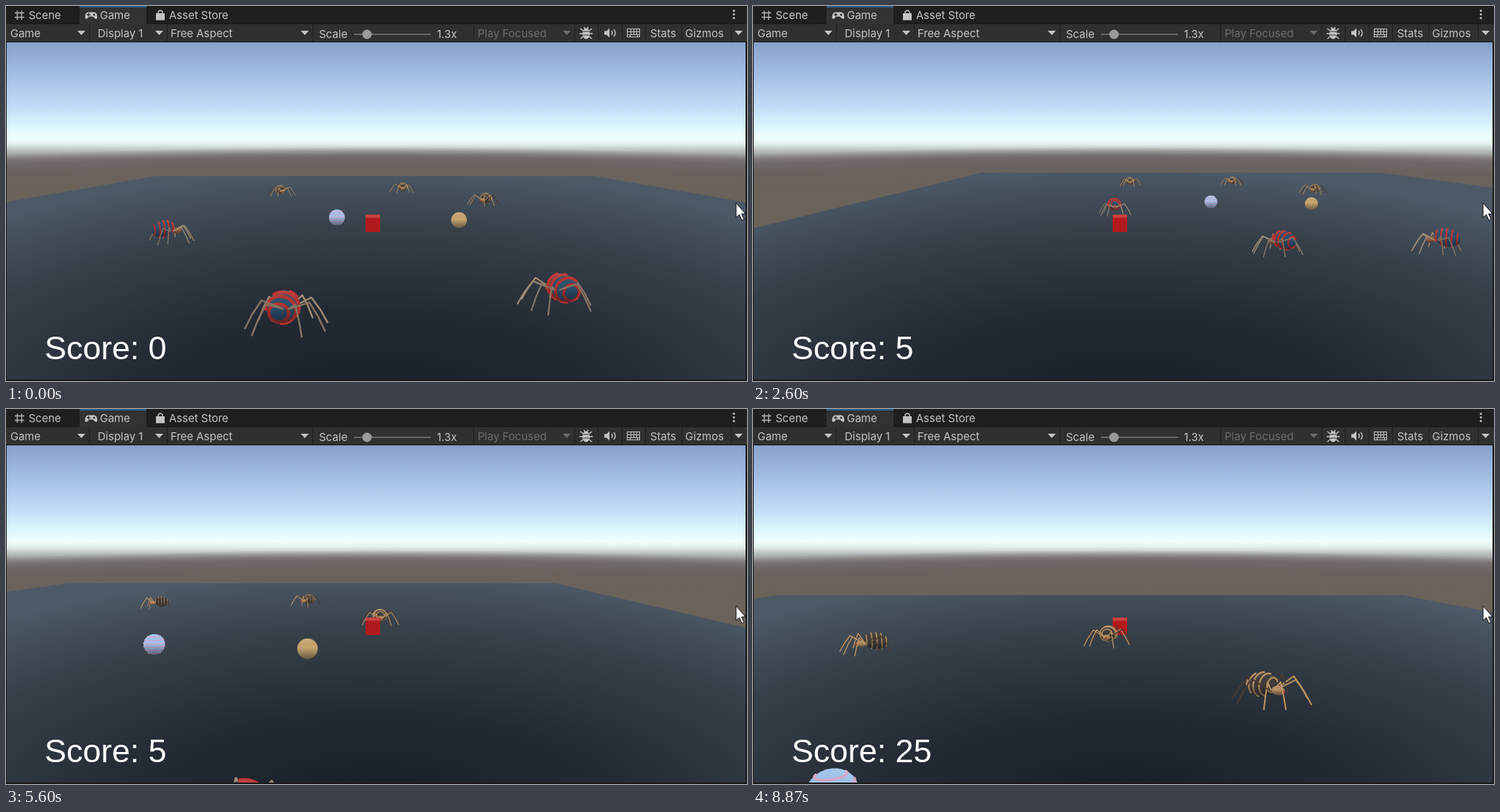
These frames come from a looping animation (1018 by 516 pixels, 8940 ms). An HTML page:

```html
<!DOCTYPE html>
<html lang="en">
<head>
<meta charset="utf-8">
<title>Game view</title>
<style>
  html, body { margin: 0; width: 100%; height: 100%; overflow: hidden; background: #191919; }
  svg { display: block; width: 1018px; height: 516px; }
  .ui { font: 15px Inter, Roboto, sans-serif; fill: #c4c4c4; }
  .score { font: 45px "Liberation Sans", Arial, sans-serif; fill: #fff; }
</style>
</head>
<body>
<svg viewBox="0 0 1018 516">
  <defs>
    <linearGradient id="sky" gradientUnits="userSpaceOnUse" x1="0" y1="50" x2="0" y2="250">
      <stop offset="0" stop-color="#86a1cb"/>
      <stop offset=".25" stop-color="#a5c2e8"/>
      <stop offset=".45" stop-color="#c2def6"/>
      <stop offset=".58" stop-color="#dcf6fd"/>
      <stop offset=".66" stop-color="#effffe"/>
      <stop offset=".7" stop-color="#e3efee"/>
      <stop offset=".75" stop-color="#b4b9b8"/>
      <stop offset=".81" stop-color="#8a8786"/>
      <stop offset="1" stop-color="#6c6663"/>
    </linearGradient>
    <radialGradient id="earth" gradientUnits="userSpaceOnUse" cx="508" cy="13100" fr="12850" r="13050">
      <stop offset="0" stop-color="#6a6359"/>
      <stop offset=".15" stop-color="#6a625e"/>
      <stop offset=".21" stop-color="#706969"/>
      <stop offset=".28" stop-color="#706969" stop-opacity="0"/>
    </radialGradient>
    <radialGradient id="floor" gradientUnits="userSpaceOnUse" cx="0" cy="0" r="1"
      gradientTransform="translate(508 545) scale(850 320)">
      <stop offset="0" stop-color="#191f27"/>
      <stop offset=".4" stop-color="#242a34"/>
      <stop offset=".75" stop-color="#374049"/>
      <stop offset="1" stop-color="#4d5967"/>
    </radialGradient>
    <linearGradient id="shade" x2="0" y2="1">
      <stop offset="0" stop-color="#fff" stop-opacity=".1"/>
      <stop offset=".45" stop-color="#000" stop-opacity="0"/>
      <stop offset="1" stop-color="#0a1020" stop-opacity=".5"/>
    </linearGradient>
    <clipPath id="view"><rect x="1" y="50" width="1015" height="464"/></clipPath>
  </defs>

  <rect width="1018" height="516" fill="#191919"/>
  <g clip-path="url(#view)">
    <rect y="50" width="1018" height="466" fill="url(#sky)"/>
    <rect y="180" width="1018" height="336" fill="url(#earth)"/>
    <path id="plane" fill="url(#floor)"/>
    <g id="scene" fill="none" stroke-linejoin="round" stroke-linecap="round"></g>
    <text id="score" class="score" x="53" y="486">Score: 0</text>
  </g>

  <g class="ui">
    <rect width="1018" height="24" fill="#1f1f1f"/>
    <rect x="101" width="92" height="25" fill="#323232"/>
    <rect x="101" width="92" height="2" fill="#2c5d87"/>
    <rect y="25" width="1018" height="24" fill="#303030"/>
    <path id="seps" stroke="#1f1f1f"/>
    <text x="31" y="18">Scene</text>
    <text x="129" y="18">Game</text>
    <text x="224" y="18">Asset Store</text>
    <text x="6" y="43">Game</text>
    <text x="126" y="43">Display 1</text>
    <text x="226" y="43">Free Aspect</text>
    <text x="430" y="44">Scale</text>
    <text x="592" y="44">1.3x</text>
    <text x="648" y="43" fill="#6c6c6c">Play Focused</text>
    <text x="885" y="43">Stats</text>
    <text x="933" y="43">Gizmos</text>
    <path d="M98 34h11l-5.5 6zM205 34h11l-5.5 6zM405 34h11l-5.5 6zM1001 34h11l-5.5 6z"/>
    <path d="M765 34h11l-5.5 6z" fill="#6c6c6c"/>
    <path d="M478 39H584" stroke="#666" stroke-width="2"/>
    <circle cx="496" cy="39" r="6.5" fill="#9a9a9a"/>
    <path d="M15.5 6.5V19M21.5 6.5V19M12 9.5H25M12 15.5H25" stroke="#b4b4b4" stroke-width="1.4"/>
    <path d="M113 8.5h8q4 0 4.5 7q-.5 4 -4 1l-2-2h-5l-2 2q-3.5 3-4-1q.5-7 4.5-7z"/>
    <path d="M111 12h5M113.5 9.500v5" stroke="#323232" stroke-width="1.3"/>
    <circle cx="121" cy="12" r="1.5" fill="#323232"/>
    <path d="M206 10h12v9.500h-12z"/>
    <path d="M209 10V8q3-4 6 0v2" fill="none" stroke="#c4c4c4" stroke-width="1.4"/>
    <circle cx="1000" cy="6.5" r="1.5"/><circle cx="1000" cy="11.5" r="1.5"/><circle cx="1000" cy="16.5" r="1.5"/>
    <ellipse cx="797" cy="38" rx="5" ry="7.5"/>
    <path d="M789 31l4 3M805 31l-4 3M788 38h18M789 45l4-3M805 45l-4-3M794 29l2 3M800 29l-2 3" stroke="#c4c4c4" stroke-width="1.4"/>
    <path d="M793 35h8M793 40h8" stroke="#303030"/>
    <path d="M822 34.5h3l4-4v13l-4-4h-3z"/>
    <path d="M832 34q2 3 0 6M835 32q4 5 0 10" fill="none" stroke="#c4c4c4" stroke-width="1.4"/>
    <rect x="853.5" y="31.5" width="17" height="11" fill="none" stroke="#c4c4c4"/>
    <path d="M853 35.5h18M853 39.5h18M858.5 32v7M862.5 32v7M866.5 32v7M857.5 39v4M867.5 39v4" stroke="#c4c4c4"/>
  </g>
  <path d="M1003 271v20l4.500-4 3.500 8 3-1.500-3.500-7.500h5.500z" fill="#fff" stroke="#111" stroke-width="1"/>
</svg>

<script>
const LOOP = 8940, STEP = 200 / 3;
const CX = 508, CY = 282, HORIZON = 182, FOCAL = 900;
const pitch = Math.atan((CY - HORIZON) / FOCAL), S = Math.sin(pitch), C = Math.cos(pitch);
const CUBE_Z = 7.45, NEAR = 1;
const $ = id => document.getElementById(id);

$('seps').setAttribute('d', [114.5, 221.5, 421.5, 642.5, 781.5, 813.5, 846.5, 878.5, 928.5, 996.5]
  .map(x => `M${x} 25V49`).join(''));

// Lengths are in camera heights; camera keys are sideways offset and far edge below the horizon.
const camX = [[0, -.01], [1070, .85], [2600, 1.7], [4400, -1.025], [5600, -1.52], [7270, -.505], [8470, -.61]];
const camP = [[0, 52], [1070, 54.2], [1870, 51.3], [2600, 47], [2900, 45.2], [3400, 44.2], [3800, 44.6],
  [4400, 48], [5600, 57.8], [6600, 63.8], [7270, 68], [7530, 71], [8100, 74]];

// Hermite curve without overshoot
function curve(keys, t) {
  const n = keys.length - 1;
  if (t >= keys[n][0]) return keys[n][1];
  let i = 0;
  while (t >= keys[i + 1][0]) i++;
  const slope = k => (keys[k + 1][1] - keys[k][1]) / (keys[k + 1][0] - keys[k][0]);
  const tangent = k => {
    if (k === 0) return slope(0);
    if (k === n) return 0;
    const a = slope(k - 1), b = slope(k);
    return a * b <= 0 ? 0 : 2 * a * b / (a + b);
  };
  const [t0, v0] = keys[i], [t1, v1] = keys[i + 1], h = t1 - t0, u = (t - t0) / h, w = 1 - u;
  return v0 * (1 + 2 * u) * w * w + h * tangent(i) * u * w * w
    + v1 * u * u * (3 - 2 * u) - h * tangent(i + 1) * u * u * w;
}

const depthAt = p => FOCAL / (C * C * p) - S / C;
const camera = t => {
  const p = curve(camP, t);
  return { x: curve(camX, t), p, back: depthAt(p) };
};

const depth = ([, u, z]) => z * C + (1 - u) * S;
function project(v) {
  const d = depth(v);
  return [CX + FOCAL * v[0] / d, CY - FOCAL * ((v[1] - 1) * C + v[2] * S) / d];
}

// Ground positions as seen on screen, turned into places on the plane
const TIMES = [0, 1070, 2600, 4400, 5600, 7270, 8870];
function track(spots) {
  const keys = [];
  spots.forEach((s, i) => {
    if (!s) return;
    const cam = camera(TIMES[i]), p = s[1] - HORIZON;
    keys.push([TIMES[i], (s[0] - CX) / (C * p) - cam.x, cam.back - depthAt(p)]);
  });
  return t => [1, 2].map(k => {
    let i = 0;
    while (i < keys.length - 1 && t >= keys[i + 1][0]) i++;
    const a = keys[i], b = keys[i + 1];
    return b ? a[k] + (b[k] - a[k]) * (t - a[0]) / (b[0] - a[0]) : a[k];
  });
}

const RED = { base: '#2c526e', ring: '#b8322e', head: '#94604a', front: '#a08c74', rear: '#857463',
  up: .13, reach: .22, stripe: .8, flee: false };
const TAN = { base: '#423e3b', ring: '#b8925f', head: '#b08a5c', front: '#b89262', rear: '#493a34',
  up: .09, reach: .245, stripe: .5, flee: true };
const spiders = [
  [TAN, [[378, 260], [444, 266], [518, 247], [321, 248], [208, 273], [232, 308], [160, 333]]],
  [TAN, [[545, 256], [626, 262], [658, 246], [472, 247], [413, 270], [511, 303], [487, 323]]],
  [TAN, [[657, 273], [767, 283], [770, 258], [551, 260], [514, 295], [699, 354], [709, 400]]],
  [RED, [[225, 324], [344, 345], [497, 287], [172, 291]]],
  [RED, [[385, 443], [660, 522], [722, 341], [236, 352]]],
  [RED, [[757, 414], null, [942, 338], [518, 349]]]
].map(([look, spots], id) => ({ look, at: track(spots), id }));

const balls = [
  { x: -.437, back: 9.93, r: .09, base: '#a0c4ee', ring: '#dba6c6', stripe: .6, rings: 6 },
  { x: .94, back: 10.15, r: .087, base: '#c8a570', rings: 0 }
];

const fmt = pts => pts.map(p => p[0].toFixed(1) + ' ' + p[1].toFixed(1)).join('L');
const line = (pts, color, width) =>
  `<path d="M${fmt(pts)}" stroke="${color}" stroke-width="${Math.max(.8, width).toFixed(2)}"/>`;
const add = (a, b, k = 1) => a.map((v, i) => v + b[i] * k);
const dot = (a, b) => a.reduce((s, v, i) => s + v * b[i], 0);

// Ellipsoid with half-axes a, b, c and stripes around a
function ellipsoid(o, a, b, c, look, rings) {
  const mid = project(o), scale = FOCAL / depth(o);
  let xx = 0, xy = 0, yy = 0;
  for (const axis of [a, b, c]) {
    const q = project(add(o, axis, .01)), dx = (q[0] - mid[0]) * 100, dy = (q[1] - mid[1]) * 100;
    xx += dx * dx; xy += dx * dy; yy += dy * dy;
  }
  const l1 = Math.sqrt(xx), l2 = xy / l1, l3 = Math.sqrt(yy - l2 * l2);
  const rim = Array.from({ length: 28 }, (_, i) => {
    const g = i * Math.PI / 14, cs = Math.cos(g);
    return [mid[0] + l1 * cs, mid[1] + l2 * cs + l3 * Math.sin(g)];
  });
  const d = 'M' + fmt(rim) + 'Z';
  let out = `<path d="${d}" fill="${look.base}"/>`;
  const size = Math.sqrt(dot(a, a));
  for (let k = 0; k < rings; k++) {
    const h = -.8 + 1.6 * k / (rings - 1), w = Math.sqrt(1 - h * h);
    let run = [];
    const flush = () => {
      if (run.length > 1) out += line(run, look.ring, scale * size * look.stripe / rings);
      run = [];
    };
    for (let i = 0; i <= 32; i++) {
      const g = i * Math.PI / 16, cb = w * Math.cos(g), cc = w * Math.sin(g);
      const v = add(add(add(o, a, h), b, cb), c, cc);
      const n = add(add(a.map(q => q * h / dot(a, a)), b, cb / dot(b, b)), c, cc / dot(c, c));
      if (dot(n, [-v[0], 1 - v[1], -v[2]]) > 0) run.push(project(v));
      else flush();
    }
    flush();
  }
  return out + `<path d="${d}" fill="url(#shade)"/>`;
}

const unit = (x, z) => {
  const n = Math.hypot(x, z) || 1;
  return [x / n, z / n];
};

// Every spider faces the cube; the tan ones later turn away from it
function heading(x, z, flee, t) {
  const to = unit(-x, CUBE_Z - z);
  if (!flee) return to;
  const away = unit(x, -1.2);
  const u = Math.min(1, Math.max(0, (t - 2600) / 1500)), k = u * u * (3 - 2 * u);
  return unit(to[0] + (away[0] - to[0]) * k, to[1] + (away[1] - to[1]) * k);
}

function drawSpider(x, z, look, id, t) {
  const [fx, fz] = heading(x, z, look.flee, t);
  const at = (f, s, u) => [x + fx * f + fz * s, u, z + fz * f - fx * s];
  const scale = FOCAL / depth([x, 0, z]);
  const far = [], near = [];
  for (const side of [-1, 1]) {
    [.5, 1.1, 1.85, 2.5].forEach((angle, i) => {
      const swing = Math.sin(t / 150 + id * 1.7 + i * Math.PI + (side > 0 ? Math.PI : 0));
      const g = angle + .11 * swing, lift = Math.max(0, swing) * .012;
      const spot = (r, u) => at(.02 + r * look.reach * Math.cos(g), side * r * look.reach * Math.sin(g), u);
      const pts = [spot(.12, look.up * .8), spot(.6, .145 + lift), spot(.82, .075 + lift), spot(1, lift)];
      const leg = line(pts.map(project), i < 2 ? look.front : look.rear, scale * .0095);
      (pts[3][2] > z ? far : near).push(leg);
    });
  }
  const abdomen = ellipsoid(at(-.06, 0, look.up), [fx * .105, .012, fz * .105],
    [fz * .085, 0, -fx * .085], [0, .078, 0], look, 5);
  let head = ellipsoid(at(.07, 0, look.up * .8), [fx * .045, 0, fz * .045], [fz * .033, 0, -fx * .033],
    [0, .028, 0], { base: look.head }, 0);
  if (fz < 0) {
    const e = project(at(.11, 0, look.up * .78));
    head += `<circle cx="${e[0].toFixed(1)}" cy="${e[1].toFixed(1)}" r="${(scale * .01).toFixed(1)}" fill="#a83230"/>`;
  }
  return far.join('') + (fz > 0 ? head + abdomen : abdomen + head) + near.join('');
}

const cube = '<path d="M494 291h20v20h-20z" fill="#b11a1c"/><path d="M494 287h20v4.500h-20z" fill="#c8413f"/>';

function draw(t) {
  const cam = camera(t);
  const mid = cam.x * cam.p * C, half = 5.79 * cam.p;
  const edge = (x, k) => [CX + x * k, HORIZON + cam.p * k];
  $('plane').setAttribute('d', 'M' + fmt([edge(mid - half, 1), edge(mid + half, 1),
    edge(mid + half, 25), edge(mid - half, 25)]) + 'Z');

  const items = [{ z: CUBE_Z, html: () => cube }];
  for (const b of balls) {
    const x = b.x + cam.x, z = cam.back - b.back, r = b.r;
    if (z > NEAR) items.push({ z, html: () => ellipsoid([x, r * 1.05, z], [0, r, 0], [r, 0, 0], [0, 0, r], b, b.rings) });
  }
  for (const s of spiders) {
    const [wx, wz] = s.at(t), x = wx + cam.x, z = cam.back - wz;
    if (z > NEAR) items.push({ z, html: () => drawSpider(x, z, s.look, s.id, t) });
  }
  items.sort((a, b) => b.z - a.z);
  $('scene').innerHTML = items.map(i => i.html()).join('');
  $('score').textContent = 'Score: ' + (t < 2200 ? 0 : t < 5800 ? 5 : 25);
}

const start = performance.now();
let shown = -1;
function tick() {
  const n = Math.floor(((performance.now() - start) % LOOP + 5) / STEP);
  if (n !== shown) draw(Math.min(n, 133) * STEP);
  shown = n;
  requestAnimationFrame(tick);
}
draw(0);
tick();
</script>
</body>
</html>
```
